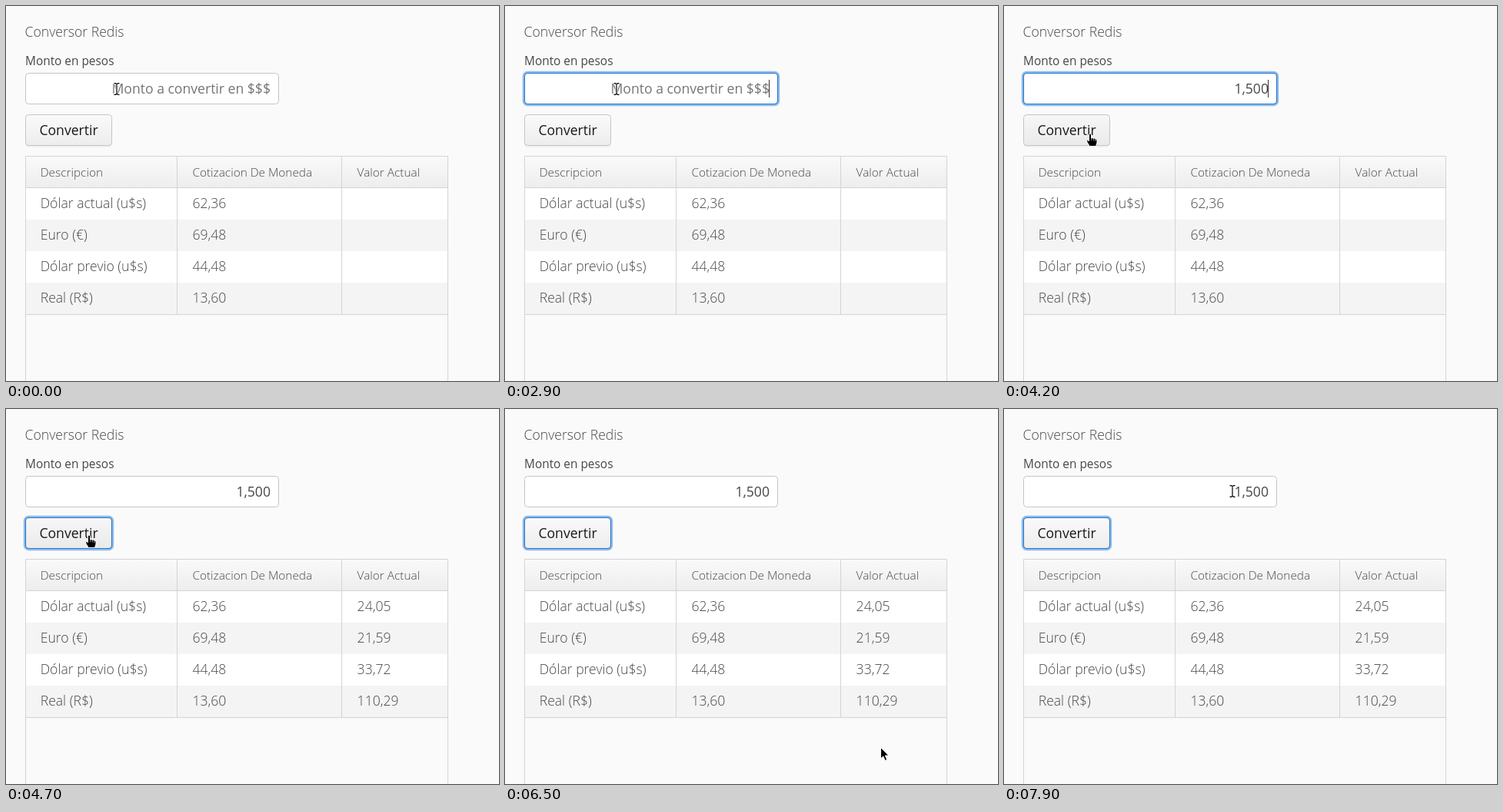
An HTML page for the animation above (8000 ms loop, 641 px wide and 488 px high).

```html
<!DOCTYPE html>
<html lang="es">
<head>
<meta charset="utf-8">
<title>Conversor Redis</title>
<style>
html, body { margin: 0; width: 100%; height: 100%; overflow: hidden; background: #fafafa; }
svg { display: block; width: 641px; height: 488px; }
text { font: 300 17.6px "Open Sans", "Noto Sans", sans-serif; fill: #474747; white-space: pre; }
.regular { font-weight: 400; }
.small { font-size: 15.4px; }
.end { text-anchor: end; }
.line { fill: none; stroke: #d4d4d4; }
.box { stroke: #c5c5c5; }
.ring rect { fill: none; stroke: #8bbdee; stroke-width: 2.4; }
.ring rect + rect { stroke: #2d74c4; stroke-width: 1.1; }

/* Each state is switched on and off by hard steps of the 8 s loop. */
.step { opacity: 0; animation: 8s step-end infinite; }
#hint { animation-name: hint; }
#one { animation-name: one; }
#two { animation-name: two; }
#three { animation-name: three; }
#four { animation-name: four; }
#total { animation-name: total; }
#inputRing { animation-name: inputRing; }
#caret { animation-name: caret; }
#buttonRing { animation-name: buttonRing; }
#results { animation-name: results; }
#hover, #hand { animation-name: hand; }
#beam { animation-name: beam; }
#arrow { animation-name: arrow; }
#pointer { animation: move 8s step-end infinite; }

@keyframes hint { 0% { opacity: 1 } 38.75% { opacity: 0 } }
@keyframes one { 38.75% { opacity: 1 } 40% { opacity: 0 } }
@keyframes two { 40% { opacity: 1 } 43.75% { opacity: 0 } }
@keyframes three { 43.75% { opacity: 1 } 45% { opacity: 0 } }
@keyframes four { 45% { opacity: 1 } 48.75% { opacity: 0 } }
@keyframes total { 48.75%, 100% { opacity: 1 } }
@keyframes inputRing { 3.75% { opacity: 1 } 57.5% { opacity: 0 } }
@keyframes caret {
  5%, 20%, 36.25% { opacity: 1 }
  12.5%, 27.5%, 57.5% { opacity: 0 }
}
@keyframes buttonRing { 57.5%, 100% { opacity: 1 } }
@keyframes results { 58.75%, 100% { opacity: 1 } }
@keyframes beam { 0%, 91.25%, 100% { opacity: 1 } 50% { opacity: 0 } }
@keyframes hand { 51.25%, 90% { opacity: 1 } 70%, 91.25% { opacity: 0 } }
@keyframes arrow { 50%, 70% { opacity: 1 } 51.25%, 90% { opacity: 0 } }
@keyframes move {
  0% { transform: translate(144px, 108px) }
  3.75% { transform: translate(145px, 108px) }
  47.5% { transform: translate(143px, 112px) }
  48.75% { transform: translate(141px, 120px) }
  50% { transform: translate(134px, 133px) }
  51.25% { transform: translate(124px, 150px) }
  52.5% { transform: translate(112px, 167px) }
  53.75% { transform: translate(108px, 165px) }
  70% { transform: translate(150px, 140px) }
  71.25% { transform: translate(240px, 95px) }
  72.5% { transform: translate(370px, 53px) }
  73.75% { transform: translate(490px, 150px) }
  75% { transform: translate(561px, 327px) }
  76.25% { transform: translate(540px, 400px) }
  77.5% { transform: translate(505px, 440px) }
  78.75% { transform: translate(480px, 446px) }
  80% { transform: translate(480px, 444px) }
  81.25% { transform: translate(488px, 440px) }
  82.5% { transform: translate(497px, 432px) }
  83.75% { transform: translate(498px, 424px) }
  85% { transform: translate(485px, 415px) }
  86.25% { transform: translate(454px, 403px) }
  87.5% { transform: translate(370px, 330px) }
  88.75% { transform: translate(220px, 220px) }
  90% { transform: translate(125px, 160px) }
  91.25% { transform: translate(276px, 97px) }
  92.5% { transform: translate(285px, 105px) }
  93.75% { transform: translate(293px, 115px) }
  95% { transform: translate(297px, 123px) }
  97.5% { transform: translate(297px, 115px) }
  98.75%, 100% { transform: translate(297px, 107px) }
}
</style>
</head>
<body>
<svg viewBox="0 0 641 488">
  <defs>
    <linearGradient id="face" x2="0" y2="1">
      <stop stop-color="#fafafa"/><stop offset="1" stop-color="#ededed"/>
    </linearGradient>
  </defs>

  <text x="24.6" y="40">Conversor Redis</text>
  <text class="regular small" x="25" y="77">Monto en pesos</text>

  <!-- Amount field -->
  <rect class="box" x="25.5" y="87.5" width="329" height="40" rx="4" fill="#fff"/>
  <g id="inputRing" class="step ring">
    <rect x="24" y="86" width="332" height="43" rx="5.5"/>
    <rect x="25.5" y="87.5" width="329" height="40" rx="4"/>
  </g>
  <g class="end">
    <text id="hint" class="step regular" x="344" y="114" style="fill:#757575">Monto a convertir en $$$</text>
    <text id="one" class="step regular" x="344" y="114">1</text>
    <text id="two" class="step regular" x="344" y="114">15</text>
    <text id="three" class="step regular" x="344" y="114">150</text>
    <text id="four" class="step regular" x="344" y="114">1500</text>
    <text id="total" class="step regular" x="344" y="114">1,500</text>
  </g>
  <rect id="caret" class="step" x="343" y="96" width="1" height="23" fill="#333"/>

  <!-- Button -->
  <rect x="25" y="142.5" width="113" height="41" rx="4.5" fill="#000" opacity=".05"/>
  <rect class="box" x="25.5" y="141.5" width="112" height="40" rx="4" fill="url(#face)"/>
  <rect id="hover" class="step" x="26" y="142" width="111" height="39" rx="3.5" fill="#000" fill-opacity=".012"/>
  <g id="buttonRing" class="step ring">
    <rect x="24" y="140" width="115" height="43" rx="5.5"/>
    <rect x="25.5" y="141.5" width="112" height="40" rx="4"/>
  </g>
  <text class="regular" x="81.5" y="167.5" text-anchor="middle" style="fill:#191919">Convertir</text>

  <!-- Rates table -->
  <rect x="25" y="195" width="550" height="42" fill="url(#face)"/>
  <path fill="#fff" d="M25 237h550v41H25zM25 319h550v41H25z"/>
  <path fill="#f4f4f4" d="M25 278h550v41H25zM25 360h550v41H25z"/>
  <path class="line" d="M25.5 488V195.5H574.5V488M25 236.5H575M25 401.5H575M222.5 195V401M436.5 195V401"/>
  <g id="heads"></g>
  <g id="rates"></g>
  <g id="results" class="step"></g>

  <!-- Mouse pointer -->
  <g id="pointer">
    <g id="beam" class="step" fill="none">
      <path stroke="#fff" stroke-width="3" d="M-4 -7H4M-4 7H4M0 -7V7"/>
      <path stroke="#000" stroke-width="1.2" d="M-3.5 -7.3H-1.5L0 -6.3L1.5 -7.3H3.5M-3.5 7.3H-1.5L0 6.3L1.5 7.3H3.5M0 -6.5V6.5"/>
    </g>
    <path id="arrow" class="step" fill="#000" stroke="#fff" stroke-linejoin="round"
      d="M.5 .5V15L3.8 12L6.2 17.5L8.7 16.4L6.4 11H11Z"/>
    <g id="hand" class="step">
      <path fill="#000" stroke="#fff" stroke-linejoin="round"
        d="M-1.5 0Q0 -2 1.5 0V5Q3 3.8 4.2 5.4Q5.8 4.4 6.8 6Q9 5.6 9 8V11L7.5 15.5H-.8L-3.8 10.5Q-5 8 -3.4 7.3L-1.5 8.6Z"/>
      <path fill="none" stroke="#fff" stroke-width=".6" d="M1.6 5V8M4.3 5.5V8.5M6.8 6.2V9"/>
    </g>
  </g>
</svg>
<script>
const columns = [44.7, 242.4, 456.6];
const heads = ["Descripcion", "Cotizacion De Moneda", "Valor Actual"];
const rows = [
  ["Dólar actual (u$s)", "62,36", "24,05"],
  ["Euro (€)", "69,48", "21,59"],
  ["Dólar previo (u$s)", "44,48", "33,72"],
  ["Real (R$)", "13,60", "110,29"]
];

function write(group, label, column, y, style = "") {
  const el = document.createElementNS("http://www.w3.org/2000/svg", "text");
  el.setAttribute("x", columns[column]);
  el.setAttribute("y", y);
  el.setAttribute("class", style);
  el.textContent = label;
  document.getElementById(group).append(el);
}

heads.forEach((label, i) => write("heads", label, i, 222, "small"));
rows.forEach((row, r) => row.forEach((label, i) =>
  write(i < 2 ? "rates" : "results", label, i, 263 + 41 * r)));
</script>
</body>
</html>
```
